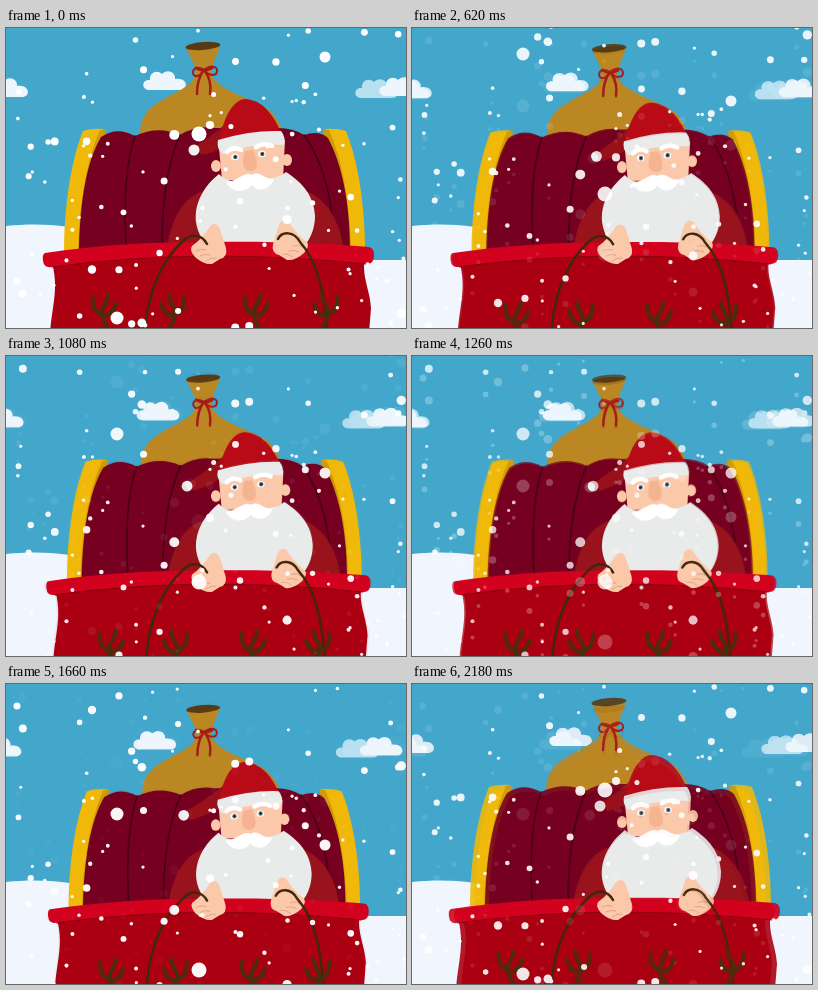
An HTML page with a canvas that plays this animation: 400 px wide and 300 px high, repeating every 2.2 s.

```html
<!DOCTYPE html>
<html lang="en">
<head>
<meta charset="utf-8">
<title>Sleigh in the snow</title>
<style>
html, body { margin: 0; width: 100%; height: 100%; overflow: hidden; background: #43a7cc; }
canvas { display: block; width: 400px; height: 300px; }
</style>
</head>
<body>
<canvas id="stage"></canvas>
<script>
const W = 400, H = 300, LOOP = 2200;
// Four moments, each dissolving into the next and the last into the first.
const MOMENTS = 4, STEP = 560;
const dpr = window.devicePixelRatio || 1;

function sheet(canvas) {
  canvas.width = W * dpr;
  canvas.height = H * dpr;
  return canvas.getContext('2d');
}

function random(seed) {
  return () => (seed = (seed * 16807) % 2147483647) / 2147483647;
}

function makeFlakes() {
  const rnd = random(90210);
  const flakes = [
    { x: 193, y: 106, r: 7.5 }, { x: 111, y: 290, r: 6.5 }, { x: 319, y: 29, r: 5.5 }
  ];
  while (flakes.length < 110) {
    flakes.push({ x: rnd() * W, y: rnd() * H, r: 1.6 + 3.4 * rnd() ** 3 });
  }
  return flakes;
}
const flakes = makeFlakes();

function drawScene(k) {
  const canvas = document.createElement('canvas');
  const g = sheet(canvas);
  const settle = 1 - Math.exp(-2 * k);
  g.scale(dpr, dpr);
  g.lineCap = g.lineJoin = 'round';

  const fill = (d, color) => { g.fillStyle = color; g.fill(new Path2D(d)); };
  const line = (d, color, width) => {
    g.strokeStyle = color;
    g.lineWidth = width;
    g.stroke(new Path2D(d));
  };
  const oval = (x, y, rx, ry, color, turn = 0) => {
    g.fillStyle = color;
    g.beginPath();
    g.ellipse(x, y, rx, ry, turn, 0, Math.PI * 2);
    g.fill();
  };
  const place = (x, y, sx, sy, draw) => {
    g.save();
    g.translate(x, y);
    g.scale(sx, sy);
    draw();
    g.restore();
  };
  const mirror = draw => {
    draw();
    place(417, 0, -1, 1, draw);
  };
  const cloud = (x, y, color) => place(x, y + 1.2 * k, 1, 1, () =>
    fill('M8 20 C-2 21-2 9 7 10 C6 3 14-1 19 4 C25-2 33 3 32 9 C45 7 46 20 37 20Z', color));

  function background() {
    g.fillStyle = '#43a7cc';
    g.fillRect(0, 0, W, H);
    cloud(-21 - 2.2 * k, 49, '#edf5fd');
    cloud(137 - 3.3 * k, 42, '#edf5fd');
    cloud(349 - 6.5 * k, 50, '#b9e0f1');
    cloud(373 - 6.5 * k, 48, '#edf5fd');
    fill('M0 198 C30 195 60 196 100 206 L300 232 H400 V300 H0Z', '#f0f5fe');
  }

  function bag() {
    fill('M180 20 C185 31 190 37 190 45 C188 59 166 65 150 76 C132 88 130 108 141 125 H279 C281 107 272 88 260 80 C244 70 211 62 205 46 C205 36 212 27 214 17Z', '#bb8723');
    oval(197, 18, 17.5, 4, '#583b14', -.08);
    line('M190 40 C195 43 200 43 206 40', '#a61b18', 3);
    line('M198 42 C188 36 184 45 189 48 Q194 49 198 42 C207 35 214 40 210 46 Q204 49 198 42', '#a61b18', 2);
    line('M197 43 Q191 52 191 66 M199 43 Q206 53 204 66', '#a61b18', 2.5);
  }

  function seat() {
    mirror(() => {
      fill('M77 103 Q86 100 98 101 L80 224 H58 C58 178 65 132 77 103Z', '#f0b90a');
      fill('M94 102 L100 101 L80 224 H72 C73 176 80 134 94 102Z', '#cf9b06');
    });
    fill('M73 222 C74 176 80 134 95 109 Q111 98 129 108 Q152 97 174 107 Q190 97 208 100 L272 100 Q287 100 298 107 Q313 102 322 110 C337 138 344 178 344 222Z', '#76001f');
    line('M129 108 C119 137 118 180 120 218 M174 107 C161 136 156 176 156 218 M298 107 C318 134 328 177 328 218', '#450019', 1.6);
  }

  function santa() {
    fill('M160 228 C163 197 174 168 201 162 L297 162 C322 170 336 196 338 228Z', '#98131c');
    oval(210, 138, 5, 6, '#fbc8aa');
    oval(281, 132, 5, 6, '#fbc8aa');
    fill('M213 120 L216 152 L277 152 L279 112Z', '#fbc8aa');
    fill('M213 146 C199 157 188 174 190 194 C193 218 219 239 251 238 C288 237 309 215 309 188 C308 168 297 155 280 144 Q272 151 260 150 L228 153 Q219 153 213 146Z', '#e9ebeb');
    for (const [x, y] of [[229, 129], [256, 126]]) {
      oval(x, y, 3.8, 3.3, '#fff');
      oval(x + .3, y, 2.2, 2.3, '#537381');
      oval(x + .3, y, 1.2, 1.3, '#202327');
    }
    fill('M239 123 Q233 143 245 143 Q256 142 247 122Z', '#f4b492');
    fill('M246 147 C238 143 231 154 220 154 C226 166 240 165 246 157 C252 165 264 162 268 151 C258 152 254 142 246 147Z', '#fff');
    hat();
    line('M221 124 Q227 118 235 122 M250 119 Q258 114 266 118', '#fff', 4.5);
  }

  function hat() {
    const x = 188 - 3.7 * k, y = 122 + 6 * settle, top = 71 + 2 * settle;
    fill(`M222 93 Q212 104 ${x + 2} ${y - 4} L${x + 7} ${y + 5} Q207 126 220 117Z`, '#981019');
    fill(`M213 118 C215 96 225 ${top} 240 ${top} C259 ${top + 2} 269 90 276 107 L276 112 L216 121Z`, '#b80a17');
    fill('M212 112 Q244 102 275 103 Q280 109 278 117 Q246 114 217 126 Q210 121 212 112Z', '#e9ebeb');
    oval(x, y, 5.5, 5.5, '#f1f0f0');
  }

  function front() {
    fill('M46 235 Q204 219 359 230 C355 247 364 262 365 280 L363 305 H44 C46 278 53 260 46 235Z', '#ab0012');
    fill('M39 225 C91 217 143 214 205 214 C270 213 326 216 363 219 Q368 220 368 227 Q368 236 361 236 C310 231 268 228 206 228 C149 228 96 232 45 239 Q38 240 37 233 Q36 226 39 225Z', '#d2021e');
    line('M46 239 C98 232 149 228 206 228 C269 228 312 231 360 236', '#8f0010', 1.2);
  }

  function hand(x, y, side) {
    place(x, y, side, 1, () => {
      fill('M3 -21 Q9 -24 12 -17 L18 2 Q20 11 12 13 L4 18 Q-4 19 -13 11 Q-19 4 -16 0 Q-7 -6 3 -21Z', '#fbc8aa');
      line('M-12 5 Q-7 2 -2 4 M-8 10 Q-3 7 2 9 M-2 15 Q3 11 8 12', '#dda083', .9);
    });
  }

  function reins() {
    line('M201 216 C195 205 184 206 177 213 C157 231 142 262 139 302', '#40280c', 2.5);
    line('M272 211 C276 203 288 203 294 214 C312 234 318 264 321 302', '#40280c', 2.5);
  }

  function antlers() {
    [97, 168, 249, 321].forEach((x, i) => {
      const spread = 204 + (x - 204) * (1 - .07 * settle);
      place(spread, 267 + 9 * settle, i % 2 ? -.85 : .85, 1, () =>
        line('M13 42 C5 32-2 27-1 16 C0 10 6 6 6 0 M0 19 C-11 18-13 8-12 2 M1 21 Q12 20 15 9', '#4b2d0c', 4.5));
    });
  }

  // Larger flakes are nearer and fall faster.
  function snow() {
    const span = H + 16;
    for (const { x, y, r } of flakes) oval(x, (y + 8 * r * k + 8) % span - 8, r, r, '#fff');
  }

  background();
  const scale = 1 - .0105 * k;
  g.save();
  g.translate(202, 235);
  g.scale(scale, scale);
  g.translate(-202, -235);
  bag();
  seat();
  santa();
  front();
  hand(202, 218, 1);
  hand(285, 214, -1);
  reins();
  g.restore();
  antlers();
  snow();
  return canvas;
}

const ctx = sheet(document.getElementById('stage'));
const scenes = Array.from({ length: MOMENTS }, (_, k) => drawScene(k));

function frame() {
  const t = Math.floor(performance.now() % LOOP / 20) * 20 / STEP;
  const k = Math.floor(t);
  ctx.globalAlpha = 1;
  ctx.drawImage(scenes[k], 0, 0);
  ctx.globalAlpha = t - k;
  ctx.drawImage(scenes[(k + 1) % MOMENTS], 0, 0);
  requestAnimationFrame(frame);
}
frame();
</script>
</body>
</html>
```
